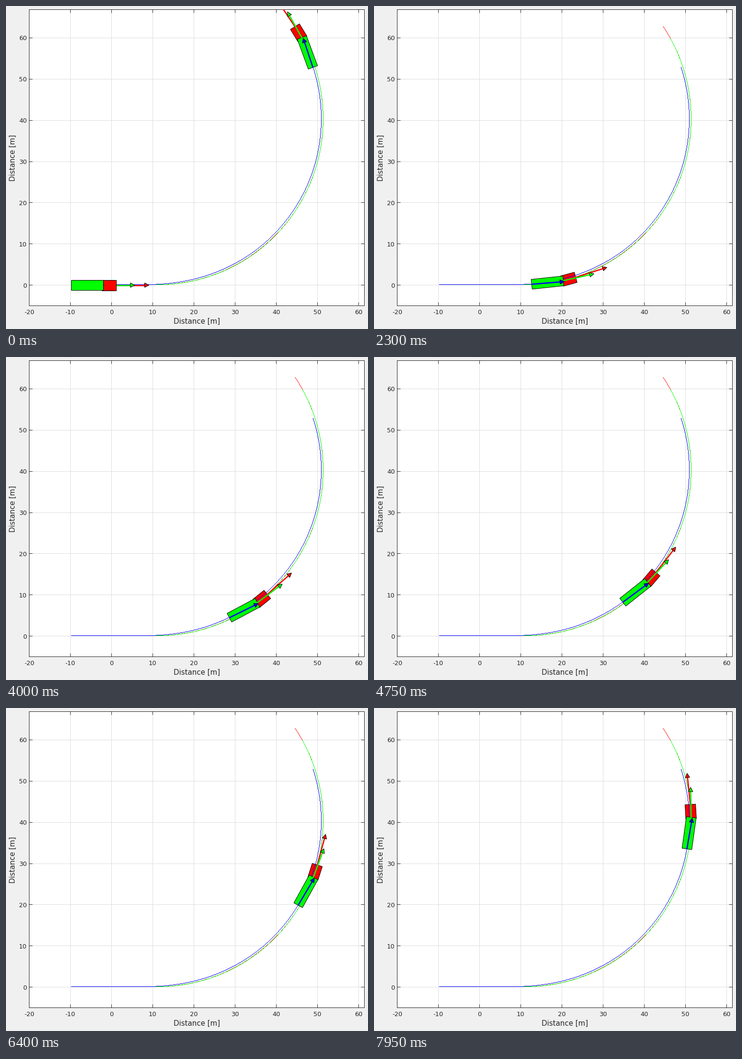
These frames come from a looping animation (756 px wide and 673 px high, 8 s). A matplotlib script:

```python
import numpy as np
import matplotlib
import matplotlib.pyplot as plt
from matplotlib.animation import FuncAnimation
from matplotlib.lines import Line2D
from matplotlib.patches import Polygon
from matplotlib.transforms import Affine2D

W, H, DPI = 756, 673, 100
PX = 72 / DPI                      # one pixel in points
SCALE = 8.594                      # pixels per metre
LEFT, BOTTOM, WIDE, HIGH = 48.1, 624.3, 700, 617
INK = "#262626"
RED, GREEN, BLUE = "#ff0000", "#00ff00", "#0000ff"
matplotlib.rcParams["font.family"] = "DejaVu Sans"

# Vehicle sizes in metres
TRACTOR, TRACTOR_W = 3.45, 2.57
TRAILER, TRAILER_W = 7.41, 2.38
OVERLAP, OVERHANG = 0.32, 1.26
RADIUS, TURN_AT, RAMP = 40.22, 13.56, 3.0
FRAMES, LAST = 160, 200


def travel(k):
    return 0.5 * k - 1e-4 * max(k - 30, 0) ** 2


def speed(k):
    return 16 * (0.5 - 2e-4 * max(k - 30, 0))


# Course of the tractor: a straight, a short easing, then a circle
DS = 0.02
S = np.arange(0, 102, DS)
KAPPA = np.clip((S - TURN_AT + RAMP / 2) / RAMP, 0, 1) / RADIUS
THETA = np.cumsum(KAPPA) * DS
HITCH_X = -2.36 + np.concatenate([[0], np.cumsum(np.cos(THETA))[:-1]]) * DS
HITCH_Y = np.concatenate([[0], np.cumsum(np.sin(THETA))[:-1]]) * DS

# The trailer is pulled along behind the hitch
PSI = np.zeros_like(S)
for i in range(1, len(S)):
    turn = np.sin(THETA[i - 1] - PSI[i - 1]) / (TRAILER - OVERHANG)
    PSI[i] = PSI[i - 1] + turn * DS
REAR_X = HITCH_X - TRAILER * np.cos(PSI)
REAR_Y = HITCH_Y - TRAILER * np.sin(PSI)


def at(s, *curves):
    return np.array([np.interp(s, S, c) for c in curves])


def unit(a):
    return np.array([np.cos(a), np.sin(a)])


def box(back, a, length, width):
    d = unit(a)
    n = np.array([-d[1], d[0]]) * width / 2
    front = back + d * length
    return np.array([back + n, front + n, front - n, back - n])


fig = plt.figure(figsize=(W / DPI, H / DPI), dpi=DPI, facecolor="#f0f0f0")
ax = fig.add_axes([LEFT / W, 1 - BOTTOM / H, WIDE / W, HIGH / H])
ax.set_xlim(-20, -20 + WIDE / SCALE)
ax.set_ylim(-5, -5 + HIGH / SCALE)
ax.set_axisbelow(True)
ax.set_xticks(range(-20, 61, 10))
ax.set_yticks(range(0, 61, 10))
ax.tick_params(direction="in", length=7 * PX, width=PX, color=INK, top=True,
               right=True, labelbottom=False, labelleft=False)
ax.grid(color="#dedede", linewidth=PX)
for spine in ax.spines.values():
    spine.set(linewidth=PX, color=INK)

# Unsnapped shapes are centred on pixels, as the grid lines are
CENTRED = ax.transData + Affine2D().translate(0.4, -0.3)


def label(x, y, text, size, **kw):
    fig.text(x / W, 1 - y / H, text, fontsize=size * PX, color=INK,
             va="baseline", **kw)


for v in range(-20, 61, 10):
    label(LEFT + 0.4 + (v + 20) * SCALE, 642, str(v), 13, ha="center")
    if v >= 0:
        label(43.5, BOTTOM - (v + 5) * SCALE + 5.2, str(v), 13, ha="right")
label(399, 662, "Distance [m]", 15, ha="center")
label(19, 316, "Distance [m]", 15, ha="center", rotation=90,
      rotation_mode="anchor")


def trace(x, y, color, z):
    """Plot a crisp curve, one dot for each pixel row or column."""
    step = np.maximum(np.abs(np.diff(x)), np.abs(np.diff(y))) * SCALE
    t = np.concatenate([[0], np.cumsum(step)])
    dots = np.arange(0, t[-1])
    ax.plot(np.interp(dots, t, x), np.interp(dots, t, y), ",", color=color,
            zorder=z)


END = travel(LAST)
hitch = S <= END
nose = (S >= TRACTOR) & (S <= END + TRACTOR)
trace(HITCH_X[nose], HITCH_Y[nose], RED, 2)
trace(HITCH_X[hitch], HITCH_Y[hitch], GREEN, 2.1)
trace(REAR_X[hitch], REAR_Y[hitch], BLUE, 3.5)


def shape(corners, color, z):
    return ax.add_patch(Polygon(np.zeros((corners, 2)), fc=color, ec="k",
                                lw=PX, zorder=z, joinstyle="miter",
                                transform=CENTRED))


class Arrow:
    HEAD, HALF = 9 / SCALE, 4.6 / SCALE

    def __init__(self, color, z):
        self.shaft = ax.add_line(Line2D([], [], color=color, lw=2.6 * PX,
                                        zorder=z, solid_capstyle="butt",
                                        transform=CENTRED))
        self.head = shape(3, color, z + 0.01)
        self.parts = [self.shaft, self.head]

    def put(self, start, a, length):
        d = unit(a)
        n = np.array([-d[1], d[0]]) * self.HALF
        tip = start + d * length
        base = tip - d * self.HEAD
        self.shaft.set_data(*zip(start, base))
        self.head.set_xy([tip, base + n, base - n])


class Truck:
    def __init__(self, z_front, z_hitch, z_tractor, z_rear, z_trailer):
        self.front = Arrow(RED, z_front)
        self.hitch = Arrow(GREEN, z_hitch)
        self.rear = Arrow(BLUE, z_rear)
        self.tractor = shape(4, RED, z_tractor)
        self.trailer = shape(4, GREEN, z_trailer)
        self.parts = [self.tractor, self.trailer, *self.front.parts,
                      *self.hitch.parts, *self.rear.parts]

    def put(self, k):
        s, v = travel(k), speed(k)
        g = at(s, HITCH_X, HITCH_Y)
        f = at(s + TRACTOR, HITCH_X, HITCH_Y)
        r = at(s, REAR_X, REAR_Y)
        a, psi = at(s, THETA, PSI)
        a_front = at(s + TRACTOR, THETA)[0]
        slip = np.arctan(OVERHANG * np.tan(a - psi) / (TRAILER - OVERHANG))
        yaw = np.arctan2(f[1] - g[1], f[0] - g[0])
        self.tractor.set_xy(box(f - TRACTOR * unit(yaw), yaw, TRACTOR, TRACTOR_W))
        self.trailer.set_xy(box(r, psi, TRAILER + OVERLAP, TRAILER_W))
        self.front.put(f, a_front, v)
        self.hitch.put(g, a, v)
        self.rear.put(r, psi - slip, v)

    def show(self, on):
        for p in self.parts:
            p.set_visible(on)


LAYERS = (5, 5.2, 3, 5.4, 4)
truck = Truck(*LAYERS)
finished = Truck(*LAYERS)
parked = Truck(4.5, 4.6, 4.7, 4.8, 4.9)
finished.put(LAST)
parked.put(0)


def draw(n):
    first = n == 0
    finished.show(first)
    parked.show(first)
    truck.show(not first)
    truck.put(max(n - 1, 0))
    return truck.parts


anim = FuncAnimation(fig, draw, frames=FRAMES, interval=50, repeat=True,
                     repeat_delay=0, blit=False)
plt.show()
```
